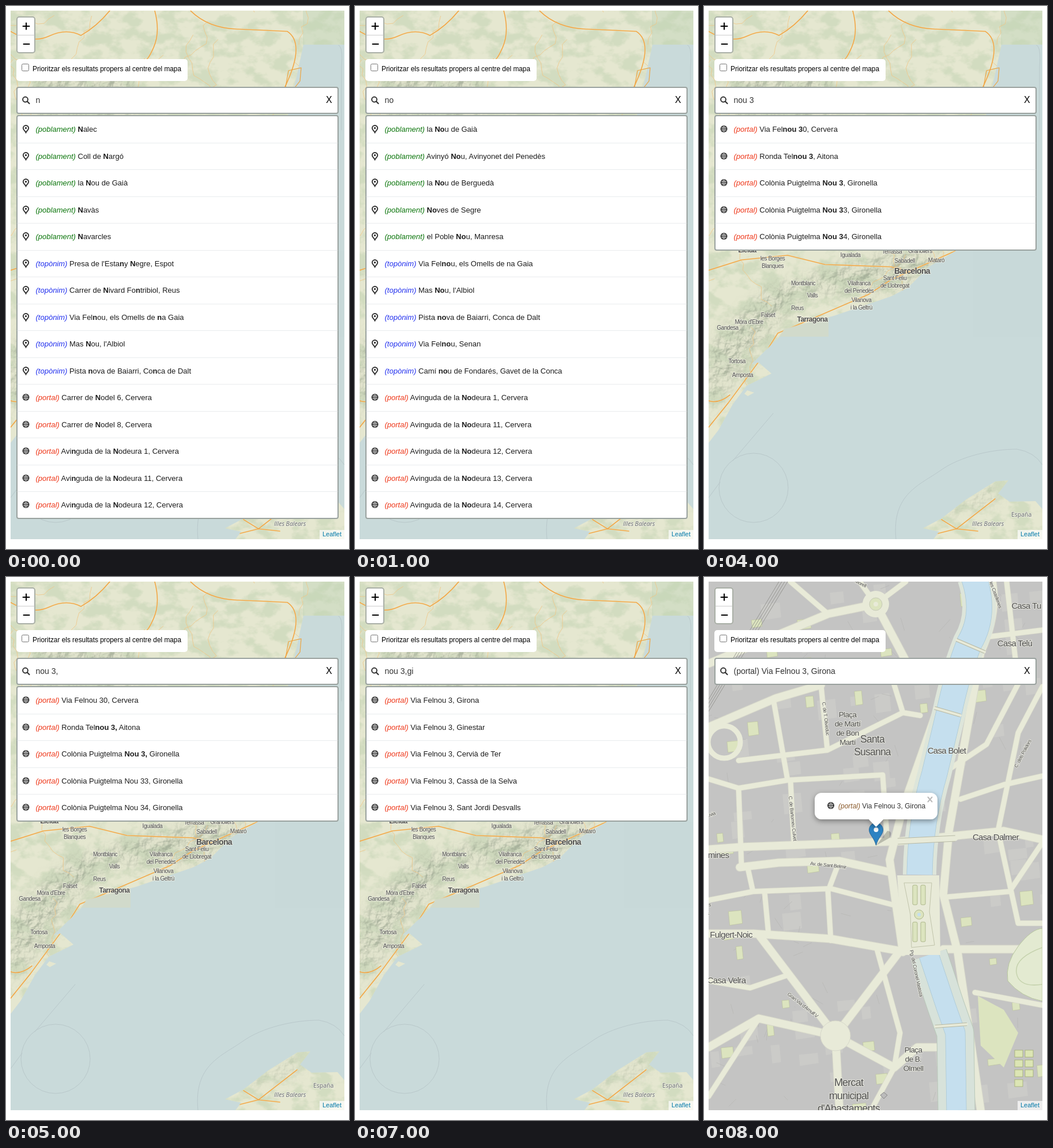
An HTML page for the animation above (9 s loop, 595 by 941 pixels).

```html
<!DOCTYPE html>
<html lang="ca">
<head>
<meta charset="utf-8">
<title>Cercador</title>
<style>
  html, body { margin: 0; width: 100%; height: 100%; overflow: hidden; background: #fff; }
  svg { display: block; width: 595px; height: 941px; }
  text { font-family: "Liberation Sans", Arial, sans-serif; white-space: pre; }
  .label { letter-spacing: -.045em; fill: #505050; stroke: #eff0e4; stroke-width: 2px; stroke-opacity: .7; paint-order: stroke; }
  .sea { font-family: "Open Sans", sans-serif; letter-spacing: 0; fill: #666a70; }
  .line { fill: none; stroke-linejoin: round; stroke-linecap: round; }
  .flat { stroke-linecap: butt; }
  .row { fill: #1c1c1c; }
</style>
</head>
<body>
<svg viewBox="0 0 595 941">
  <defs>
    <clipPath id="frame"><rect x="8" y="8" width="579" height="916"/></clipPath>
    <clipPath id="land">
      <path d="M8 8H587V67H516L500 140 437 424 390 452 354 488 325 503 225 537 140 560 130 574 82 621 95 618 117 637 74 658 50 690 25 735 8 757Z"/>
      <path d="M380 905L412 888 455 855 505 824 528 822 510 845 530 859 575 858 587 872V924H398L408 911Z"/>
    </clipPath>
    <filter id="woods" x="0" y="0" width="1" height="1" color-interpolation-filters="sRGB">
      <feTurbulence type="fractalNoise" baseFrequency=".03 .045" numOctaves="4" seed="8"/>
      <feColorMatrix values="0 0 0 0 .75  0 0 0 0 .82  0 0 0 0 .69  0 5 0 0 -2.2"/>
    </filter>
    <filter id="relief" x="-.2" y="-.2" width="1.4" height="1.4" color-interpolation-filters="sRGB">
      <feTurbulence type="fractalNoise" baseFrequency=".06" numOctaves="4" seed="4"/>
      <feDiffuseLighting surfaceScale="7"><feDistantLight azimuth="225" elevation="60"/></feDiffuseLighting>
      <feColorMatrix values="0 0 0 0 .6  0 0 0 0 .64  0 0 0 0 .56  -1.3 0 0 0 1.35" result="shade"/>
      <feGaussianBlur in="SourceAlpha" stdDeviation="12" result="area"/>
      <feComposite in="shade" in2="area" operator="in"/>
    </filter>
    <filter id="shadow" x="-.2" y="-.4" width="1.4" height="2"><feDropShadow dx="0" dy="3" stdDeviation="5" flood-opacity=".4"/></filter>
    <g id="pin">
      <path d="M0 6.3C-1.5 3-4.7 1.6-4.7-1.3A4.7 4.7 0 0 1 4.7-1.3C4.7 1.6 1.5 3 0 6.3Z" fill="#fff" stroke="#333" stroke-width="1.9"/>
      <circle cy="-1.5" r="1.7" fill="#333"/>
    </g>
    <g id="globe"><circle r="6" fill="#333"/><path class="line" d="M-4-1.8H4M-4 1.8H4M0-4.5V4.5" stroke="#fff" stroke-width=".7"/><ellipse rx="2.5" ry="4.6" fill="none" stroke="#fff" stroke-width=".6"/></g>
  </defs>
  <g clip-path="url(#frame)">
    <g id="region"></g>
    <g id="city"></g>
  </g>
  <g id="controls"></g>
  <g id="results"></g>
</svg>
<script>
const byId = id => document.getElementById(id);
const repeat = (count, make) => Array.from({ length: count }, (_, i) => make(i)).join("");
const path = (d, fill, extra = "") => `<path d="${d}" fill="${fill}" ${extra}/>`;
const line = (d, color, width, kind = "") => `<path class="line ${kind}" d="${d}" stroke="${color}" stroke-width="${width}"/>`;
const box = (x, y, w, h, r, fill, extra = "") => `<rect x="${x}" y="${y}" width="${w}" height="${h}" rx="${r}" fill="${fill}" ${extra}/>`;
const circle = (x, y, r, fill, extra = "") => `<circle cx="${x}" cy="${y}" r="${r}" fill="${fill}" ${extra}/>`;
const text = (x, y, size, content, extra = "") => `<text x="${x}" y="${y}" font-size="${size}" ${extra}>${content}</text>`;
const label = (x, y, size, lines, extra = "", leading = size * 1.3) =>
  lines.split("/").map((s, i) => text(x, y + i * leading, size, s, `class="label" text-anchor="middle" ${extra}`)).join("");
const street = (x, y, angle, name) => text(0, 0, 8.5, name, `class="label" transform="translate(${x} ${y}) rotate(${angle})"`);

function seeded(seed) {
  return (low, high) => {
    seed = (seed * 16807) % 2147483647;
    return low + (high - low) * seed / 2147483647;
  };
}

// A meandering country road that keeps roughly to its first heading.
function wander(random) {
  let x = random(8, 587), y = random(8, 600), d = `M${x} ${y}`;
  const heading = random(0, 2 * Math.PI);
  for (let i = 0; i < 12; i++) {
    const angle = heading + random(-.9, .9);
    d += `L${x += 11 * Math.cos(angle)} ${y += 11 * Math.sin(angle)}`;
  }
  return d;
}

function regionMap() {
  const random = seeded(77);
  const motorways =
    "M8 44Q45 66 75 52T130 51Q158 35 180 8M258 8Q268 45 256 72T240 92M320 8Q350 38 400 40T488 44Q520 65 484 140" +
    "M437 424L325 474 285 500 185 543 128 567 107 600 42 688 8 730M8 458L65 440 145 432 210 448 325 452 360 462" +
    "M8 684Q25 690 45 674M390 918L438 906 505 854M412 890L438 906 475 910";
  const small = (x, y, name) => label(x, y, 10, name);
  return box(8, 8, 579, 916, 0, "#c9dada") + box(466, 424, 121, 150, 0, "#c8d9d9") +
    `<g clip-path="url(#land)">` +
      box(8, 8, 579, 916, 0, "#e5e7d0") + box(515, 8, 72, 60, 0, "#d3dec5") +
      box(8, 8, 579, 916, 0, "#fff", `filter="url(#woods)" opacity=".5"`) +
      path("M50 122L220 112V190H45ZM8 590L110 490 330 424H430L340 490 170 500 100 580 8 710ZM405 890L500 835 515 850Z", "#000", `filter="url(#relief)" opacity=".75"`) +
      line(repeat(45, () => wander(random)), "#f0c684", .8) +
      line(motorways, "#f6d391", 2) + line(motorways, "#eda042", 1.2) +
    `</g>` +
    path("M130 573L140 559 216 540V573Z", "#d5dac6", `opacity=".75"`) +
    path("M70 672L75 666 87 670 76 676Z", "#e5e7d0") +
    line("M333 924C325 845 375 830 410 805S500 768 543 768Q573 773 587 795M120 706L50 788M8 852L28 825M577 68Q585 72 582 105V215", "#b7c6c9", .9) +
    circle(86, 835, 60, "none", `stroke="#b9c8ca"`) +
    line("M485 140L490 112 512 107 510 130 502 140", "#eda33f", 1.2) +
    small(119, 441, "les Borges/Blanques") + small(254, 435, "Igualada") + small(326, 429, "Terrassa") + small(375, 428, "Granollers") +
    small(348, 445, "Sabadell") + small(403, 444, "Mataró") + small(331, 475, "Sant Feliu/de Llobregat") +
    small(269, 484, "Vilafranca/del Penedès") + small(172, 484, "Montblanc") + small(188, 505, "Valls") +
    small(273, 513, "Vilanova/i la Geltrú") + small(162, 527, "Reus") + small(111, 539, "Falset") + small(78, 551, "Móra d'Ebre") +
    small(41, 561, "Gandesa") + small(57, 619, "Tortosa") + small(67, 643, "Amposta") +
    label(75, 427, 12, "Lleida", `font-weight="bold"`) + label(361, 464, 14, "Barcelona", `font-weight="bold"`) +
    label(188, 547, 12, "Tarragona", `font-weight="bold"`) +
    text(465, 901, 10.5, "Illes Balears", `class="label sea" font-style="italic"`) + text(533, 885, 10.5, "España", `class="label sea"`);
}

// An irregular plot, tilted slightly like the streets around it.
function plot(random, size) {
  const w = random(.4, 1) * size, h = random(.4, 1) * size;
  return `M${random(8, 587)} ${random(8, 924)}l${w} ${-.1 * w} ${.1 * h} ${h} ${-w} ${.15 * w}z`;
}

function cityMap() {
  const random = seeded(31);
  const ground = "#e8ead8", water = "#c5dfee";
  const avenues =
    "M8 472L62 468 340 458 520 440 587 455M62 503L130 495 235 492 325 512M8 618H85L220 627 340 648 228 795 95 620" +
    "M420 187L345 400 322 490 345 650M500 8Q510 65 480 130L425 440 415 550 440 650 480 924M415 645H587" +
    "M228 795L95 765 8 815M228 795L330 850 370 815 408 815M228 795L235 924M8 150L215 64 298 47 350 145M8 260L125 210 203 187";
  const lanes =
    "M8 350L60 366 145 352 310 343 318 460M60 366L65 500M150 352L156 465M203 187L214 300 60 318M120 210L145 352M330 187L345 235 214 300" +
    "M345 235L375 240M8 560L85 545 220 540 335 570M235 492L215 545 220 630M75 500L85 545M105 545L112 620M8 700L80 712 145 690" +
    "M587 190L545 270 510 440 545 600 587 600M430 330L490 290 545 185 525 8M415 555L530 545 587 460M445 385L520 360 587 345" +
    "M298 47L270 8M298 47L350 8M215 64L150 8M95 765L8 900M290 924L330 850M300 645L340 790 330 850M470 720L587 742M440 110L587 92";
  const parcels = repeat(75, () => plot(random, 34)), gardens = repeat(38, () => plot(random, 24));
  const fences = repeat(90, () => `M${random(8, 587)} ${random(8, 924)}l${random(-22, 22)} ${random(-22, 22)}`);
  const upperRiver = "M468 0Q490 65 460 115 440 165 425 235L400 340Q375 425 374 516", lowerRiver = "M390 655L420 745 436 790 438 924";
  const bridge = (d, width) => line(d, "#b7b9a5", width + 2, "flat") + line(d, ground, width);
  const courts = repeat(7, i => box(539 + i % 2 * 18, 820 + Math.floor(i / 2) * 17, 14, 12, 0, "#dce5b4", `stroke="#a0ac72" stroke-width=".8"`));
  return box(8, 8, 579, 916, 0, "#c4c4c3") +
    path(parcels, "#cbcbc8") + line(fences, "#b6b6b3", .7) +
    path(gardens, "#dce4bf", `stroke="#b9bf9b" stroke-width=".6"`) +
    line(avenues, "#d7d8ca", 15) + line(lanes, "#d7d8ca", 10) + line(avenues, ground, 13) + line(lanes, ground, 8.5) +
    path("M475 726L520 750 545 790 520 850 480 812Z", "#dce4bf") + courts +
    path("M527 700Q522 670 545 640T587 609V735Q550 728 527 700Z", "#e3ead1", `stroke="#b7c69e"`) +
    line("M587 642Q538 660 542 686T587 706", "#c5d2ad", 1.5) +
    line(upperRiver, "#dde5da", 58, "flat") + line(upperRiver, "#aac8d5", 45, "flat") + line(upperRiver, water, 43.5, "flat") +
    line(lowerRiver, "#b9c8b9", 65, "flat") + line(lowerRiver, "#d7e2da", 63, "flat") +
    line(lowerRiver, "#aac8d5", 35, "flat") + line(lowerRiver, water, 33.5, "flat") +
    bridge("M438 109L487 130", 4) + bridge("M400 227L445 240", 4) + bridge("M336 458L436 453", 9) + bridge("M401 779L456 775", 4) +
    path("M335 517H408L410 655H345Z", ground) +
    path("M347 530H395L391 580 400 638 360 642 358 585Z", "none", `stroke="#c1c4ab"`) +
    repeat(4, i => box(362 + i % 2 * 14, i < 2 ? 534 : 598, 8, 34, 2, "#dce4bf", `stroke="#aeb88c"`)) +
    circle(373, 585, 8, "#dce4bf", `stroke="#aeb88c"`) + circle(373, 585, 3, water) +
    circle(298, 47, 23, ground) + circle(298, 47, 11, "#dce4bf", `stroke="#c7cab8"`) + circle(298, 47, 4, ground) +
    circle(228, 795, 26, ground, `stroke="#d7d8ca"`) + circle(35, 286, 28, "none", `stroke="${ground}" stroke-width="9"`) +
    path("M306 898L312 893 318 898 312 904Z", "#bbb", `stroke="#888"`) +
    repeat(4, i => line(`M${130 + 5 * i} 8L8 ${212 + 7 * i}`, "#8c8c87", .8)) +
    street(261, 9, 27, "Morell") + street(495, 9, 70, "les Cistelleries") +
    street(205, 217, 83, "C. de T. Oliveduc") + street(147, 380, 84, "C. de Bartomeu Culvet") +
    street(184, 499, 6, "Av. de Sant Belmir") + street(357, 647, 78, "Pg. del Coronel Vastoza") +
    street(144, 724, 38, "Gran Via d'Arnulf V") + street(543, 331, -62, "C. dels Polidors") +
    street(7, 416, -18, "uvia") + street(8, 571, 0, "s") + street(5, 586, 0, "s") +
    label(559, 55, 15, "Casa Tu") + label(539, 120, 15, "Casa Telú") + label(421, 306, 15, "Casa Bolet") +
    label(506, 456, 15, "Casa Dalmer") + label(39, 704, 15, "Casa Velra") + label(47, 625, 15, "Fulgert-Noic") +
    label(25, 487, 15, "mines") + label(292, 287, 17.5, "Santa/Susanna", "", 22) +
    label(249, 243, 13.5, "Plaça/de Martí/de Bon/Martí", "", 16) + label(363, 824, 13.5, "Plaça/de B./Olmell", "", 16) +
    label(251, 882, 18, "Mercat/municipal/d'Abastaments", "", 22.5) + marker();
}

function marker() {
  return path("M299 465L318 440Q328 440 322 452Z", "#000", `opacity=".2"`) +
    path("M298.5 465C295 451 286.5 447 286.5 438A12 12 0 0 1 310.5 438C310.5 447 302 451 298.5 465Z", "#2d83c3", `stroke="#2e6c97"`) +
    circle(298.5, 438, 4, "#fff") +
    `<g filter="url(#shadow)">${box(192, 374, 213, 46, 12, "#fff")}${path("M285 419H312L298.5 433Z", "#fff")}</g>` +
    line("M388.5 381.5L395.5 389.5M395.5 381.5L388.5 389.5", "#bbb", 2) +
    `<use href="#globe" x="220" y="396"/>` +
    text(233, 401, 12, `<tspan font-style="italic" fill="#8a5a2b">(portal)</tspan> Via Felnou 3, Girona`, `fill="#333"`);
}

function controls() {
  return box(19, 19, 31, 62, 4, "#fff", `stroke="#a9afa6" stroke-width="2"`) + line("M20 50.5H49", "#ccc", 1) +
    line("M29.5 35H40.5M35 29.5V40.5M30.5 66H40.5", "#000", 2) +
    box(18, 92, 297, 38, 5, "#fff") + box(27.5, 100.5, 12, 12, 2, "#fff", `stroke="#767676"`) +
    text(46, 112.5, 11.85, "Prioritzar els resultats propers al centre del mapa") +
    box(19, 141, 557, 45, 3, "#fff", `stroke="#9aa29f" stroke-width="2"`) +
    circle(33.5, 162, 4.4, "none", `stroke="#333" stroke-width="2"`) + line("M37 165.5L40.5 169", "#333", 2.2) +
    text(51.5, 168, 14, "", `id="query" fill="#333"`) + text(555, 168, 16, "X") +
    box(544, 908, 43, 16, 0, "#fff", `opacity=".7"`) + text(549, 919, 11, "Leaflet", `fill="#0078a8"`);
}

const kinds = { poblament: "#0b750b", "topònim": "#2230ee", portal: "#ee3517" };
const group = (kind, names) => names.split(";").map(name => [kind, name]);
const mixed = (places, toponyms, portals) => [...group("poblament", places), ...group("topònim", toponyms), ...group("portal", portals)];
const numbered = (name, town, numbers) => numbers.map(n => `${name} ${n}, ${town}`).join(";");
const colony = numbers => numbered("Colònia Puigtelma Nou", "Gironella", numbers);
const thirties = group("portal", "Via Felnou 30, Cervera;Ronda Telnou 3, Aitona;" + colony([3, 33, 34]));

const states = [
  { at: 0, query: "n", rows: mixed("Nalec;Coll de Nargó;la Nou de Gaià;Navàs;Navarcles",
    "Presa de l'Estany Negre, Espot;Carrer de Nivard Fontribiol, Reus;Via Felnou, els Omells de na Gaia;Mas Nou, l'Albiol;Pista nova de Baiarri, Conca de Dalt",
    numbered("Carrer de Nodel", "Cervera", [6, 8]) + ";" + numbered("Avinguda de la Nodeura", "Cervera", [1, 11, 12])) },
  { at: 1000, query: "no", rows: mixed("la Nou de Gaià;Avinyó Nou, Avinyonet del Penedès;la Nou de Berguedà;Noves de Segre;el Poble Nou, Manresa",
    "Via Felnou, els Omells de na Gaia;Mas Nou, l'Albiol;Pista nova de Baiarri, Conca de Dalt;Via Felnou, Senan;Camí nou de Fondarés, Gavet de la Conca",
    numbered("Avinguda de la Nodeura", "Cervera", [1, 11, 12, 13, 14])) },
  { at: 2000, query: "nou", rows: mixed("la Nou de Gaià;Avinyó Nou, Avinyonet del Penedès;la Nou de Berguedà;el Poble Nou, Manresa;el Corral Nou, Avinyó",
    "Mas Nou, l'Albiol;Via Felnou, Senan;Camí nou de Fondarés, Gavet de la Conca;Camí nou de la Rufa, Isona i Conca Dellà;Via Felnou, Anglesola",
    numbered("Via Felnou", "Cervera", [11, 14, 15, 16, 17])) },
  { at: 4000, query: "nou 3", rows: thirties },
  { at: 5000, query: "nou 3,", rows: thirties },
  { at: 6000, query: "nou 3,g", rows: group("portal", colony([3, 33, 34, 35, 36])) },
  { at: 7000, query: "nou 3,gi", rows: ["Girona", "Ginestar", "Cervià de Ter", "Cassà de la Selva", "Sant Jordi Desvalls"].map(town => ["portal", "Via Felnou 3, " + town]) },
  { at: 8000, query: "(portal) Via Felnou 3, Girona", rows: [] }
];

function resultList({ query, rows }) {
  if (!rows.length) return "";
  const pitch = 46.5, match = new RegExp(query, "gi");
  return box(19, 190, 557, rows.length * pitch + .5, 3, "#fff", `stroke="#9aa29f" stroke-width="2"`) +
    rows.map(([kind, name], i) => {
      const y = Math.round(213 + i * pitch);
      const marked = name.replace(match, `<tspan font-weight="bold">$&</tspan>`);
      return (i ? line(`M20 ${y - 22.5}H575`, "#e9ecee", 1) : "") +
        `<use href="#${kind == "portal" ? "globe" : "pin"}" x="34.5" y="${y}"/>` +
        text(51.5, y + 5, 13, `<tspan font-style="italic" fill="${kinds[kind]}">(${kind})</tspan> ${marked}`, `class="row"`);
    }).join("");
}

byId("region").innerHTML = regionMap();
byId("city").innerHTML = cityMap();
byId("controls").innerHTML = controls();

let shown;
function draw() {
  const time = performance.now() % 9000;
  const state = states.findLast(s => time >= s.at);
  if (state !== shown) {
    shown = state;
    const found = !state.rows.length;
    byId("region").style.display = found ? "none" : "";
    byId("city").style.display = found ? "" : "none";
    byId("query").textContent = state.query;
    byId("results").innerHTML = resultList(state);
  }
  requestAnimationFrame(draw);
}
draw();
</script>
</body>
</html>
```
